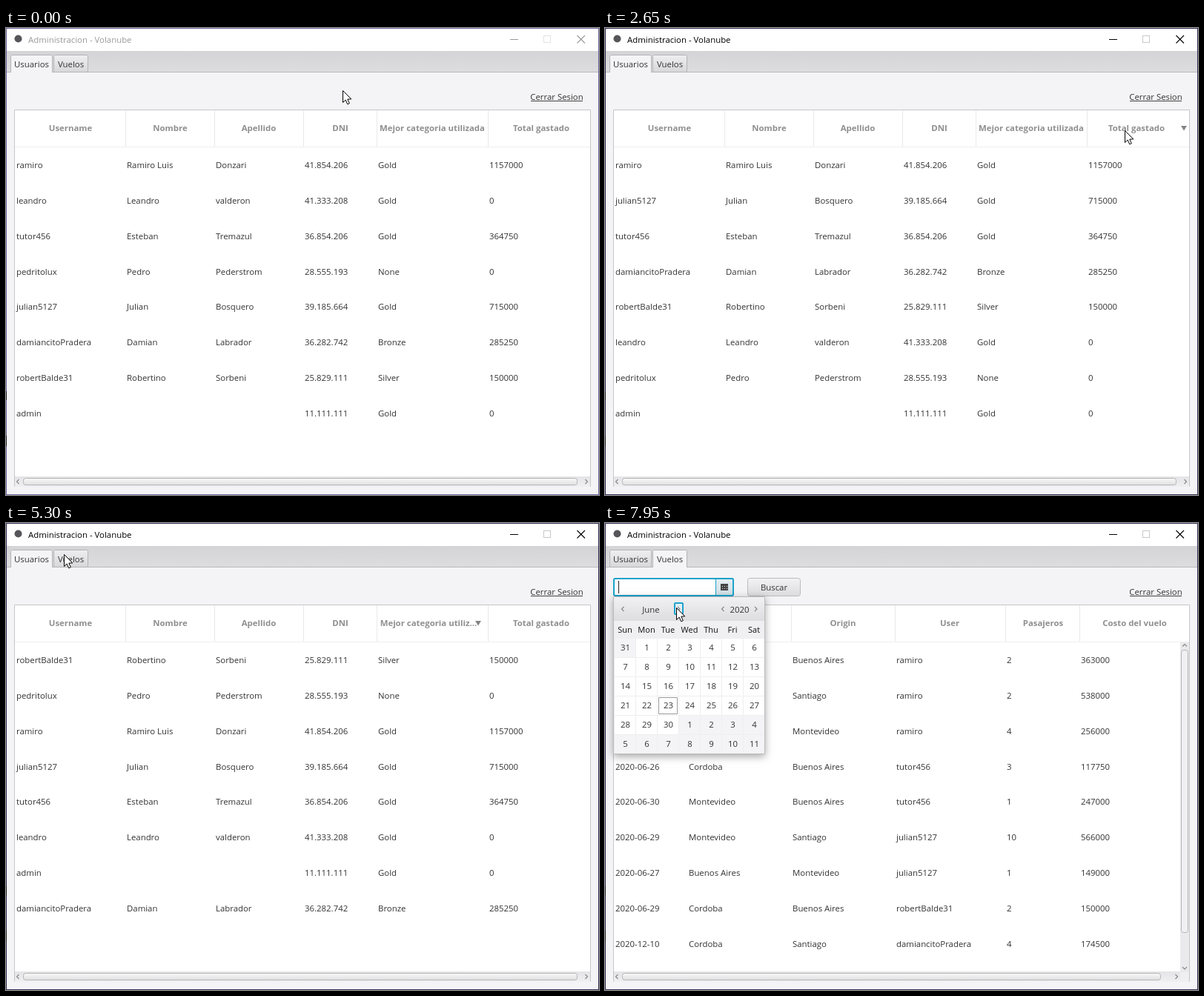
Write an HTML page with a canvas that moves like this. It is 800 by 630 pixels and loops after 8 s.

```html
<!DOCTYPE html>
<html lang="es">
<head>
<meta charset="utf-8">
<title>Administracion</title>
<style>
html, body { margin: 0; width: 100%; height: 100%; overflow: hidden; background: #f4f3f5; }
canvas { display: block; width: 800px; height: 630px; }
</style>
</head>
<body>
<canvas id="stage" width="800" height="630"></canvas>
<script>
const g = document.getElementById('stage').getContext('2d');
const LOOP = 8000, STEP = 50;
const SANS = '"Open Sans", "Noto Sans", sans-serif';
const BODY = `11.4px ${SANS}`, BOLD = `bold 11.4px ${SANS}`, SMALL = `11px ${SANS}`;
const INK = '#333', BLUE = '#1ba3cb', EDGE = '#bcbbbd';

// Moments at which the state jumps
const T = { active: 1100, sort1: 1200, sort2: 2300, sort3: 3600, sort4: 4350,
            flights: 5450, popup: 6800, field: 6850, next: 7950 };

// [start, end, x, y]: the pointer arrives at x, y at the end
const MOVES = [
  [100, 950, 695, 136],
  [1100, 1800, 701, 138],
  [2750, 3200, 601, 134],
  [4350, 5150, 78, 42],
  [5550, 6250, 162, 84],
  [6950, 7850, 96, 114]
];

const users = [
  ['ramiro', 'Ramiro Luis', 'Donzari', '41.854.206', 'Gold', '1157000'],
  ['leandro', 'Leandro', 'valderon', '41.333.208', 'Gold', '0'],
  ['tutor456', 'Esteban', 'Tremazul', '36.854.206', 'Gold', '364750'],
  ['pedritolux', 'Pedro', 'Pederstrom', '28.555.193', 'None', '0'],
  ['julian5127', 'Julian', 'Bosquero', '39.185.664', 'Gold', '715000'],
  ['damiancitoPradera', 'Damian', 'Labrador', '36.282.742', 'Bronze', '285250'],
  ['robertBalde31', 'Robertino', 'Sorbeni', '25.829.111', 'Silver', '150000'],
  ['admin', '', '', '11.111.111', 'Gold', '0']
];
const flights = [
  ['2020-06-25', 'Santiago', 'Buenos Aires', 'ramiro', '2', '363000'],
  ['2020-06-28', 'Buenos Aires', 'Santiago', 'ramiro', '2', '538000'],
  ['2020-06-26', 'Cordoba', 'Montevideo', 'ramiro', '4', '256000'],
  ['2020-06-26', 'Cordoba', 'Buenos Aires', 'tutor456', '3', '117750'],
  ['2020-06-30', 'Montevideo', 'Buenos Aires', 'tutor456', '1', '247000'],
  ['2020-06-29', 'Montevideo', 'Santiago', 'julian5127', '10', '566000'],
  ['2020-06-27', 'Buenos Aires', 'Montevideo', 'julian5127', '1', '149000'],
  ['2020-06-29', 'Cordoba', 'Buenos Aires', 'robertBalde31', '2', '150000'],
  ['2020-12-10', 'Cordoba', 'Santiago', 'damiancitoPradera', '4', '174500']
];

// Each sort is stable and starts from the order before it
const byTotal = (a, b) => a[5] - b[5];
const byClass = (a, b) => a[4] < b[4] ? -1 : a[4] > b[4] ? 1 : 0;
const flip = cmp => (a, b) => cmp(b, a);
const orders = [users];
[byTotal, flip(byTotal), byClass, flip(byClass)].forEach(cmp =>
  orders.push([...orders[orders.length - 1]].sort(cmp)));

function text(s, x, y, { font = BODY, color = INK, align = 'left' } = {}) {
  g.font = font;
  g.fillStyle = color;
  g.textAlign = align;
  g.fillText(s, x, y);
}

function fill(x, y, w, h, color) {
  g.fillStyle = color;
  g.fillRect(x, y, w, h);
}

function shade(y1, y2, c1, c2) {
  const s = g.createLinearGradient(0, y1, 0, y2);
  s.addColorStop(0, c1);
  s.addColorStop(1, c2);
  return s;
}

// The edge lies inside the given rectangle
function box(x, y, w, h, r, paint, edge, width = 1) {
  g.beginPath();
  g.roundRect(x + width / 2, y + width / 2, w - width, h - width, r);
  if (paint) { g.fillStyle = paint; g.fill(); }
  if (edge) { g.strokeStyle = edge; g.lineWidth = width; g.stroke(); }
}

function line(points, color, width = 1) {
  g.beginPath();
  points.forEach(([x, y]) => g.lineTo(x, y));
  g.strokeStyle = color;
  g.lineWidth = width;
  g.stroke();
}

// dx, dy: the direction the chevron points in
function chevron(x, y, dx, dy, r = 3, color = '#858585') {
  const tip = [x + dx * r / 2, y + dy * r / 2];
  const bx = x - dx * r / 2, by = y - dy * r / 2;
  line([[bx - dy * r, by - dx * r], tip, [bx + dy * r, by + dx * r]], color, 1.1);
}

function sortMark(x, up) {
  const k = up ? -1 : 1;
  g.beginPath();
  g.moveTo(x - 4, 135 - 3 * k);
  g.lineTo(x + 4, 135 - 3 * k);
  g.lineTo(x, 135 + 3.5 * k);
  g.fillStyle = '#858587';
  g.fill();
}

function tab(x, w, label, selected, focused) {
  box(x, 36, w, selected ? 27 : 24, 2,
      selected ? '#f4f3f5' : shade(36, 59, '#efeef0', '#d8d7d9'), focused ? BLUE : '#b4b3b6');
  if (selected) fill(x - 1, 60, w + 2, 4, '#f4f3f5');
  text(label, x + w / 2, 53, { align: 'center' });
}

function frame(active, onFlights, focusTab) {
  const ink = active ? '#000' : '#999';
  fill(0, 0, 800, 630, '#f4f3f5');
  fill(0, 0, 800, 31, '#fff');
  g.beginPath();
  g.arc(16.5, 14.5, 5, 0, 7);
  g.fillStyle = '#55555a';
  g.fill();
  text('Administracion - Volanube', 30, 20, { font: `11.4px ${SANS}`, color: ink });
  line([[680, 15.5], [691, 15.5]], ink);
  g.strokeStyle = active ? '#c8c8c8' : '#e2e2e2';
  g.strokeRect(725.5, 10.5, 9, 9);
  line([[770.5, 10], [781, 20.5]], ink, 1.1);
  line([[781, 10], [770.5, 20.5]], ink, 1.1);

  fill(1, 31, 798, 29, shade(31, 60, '#d4d3d6', '#dddcdf'));
  fill(1, 59, 798, 1, '#b9b8bb');
  tab(6, 57, 'Usuarios', !onFlights, false);
  tab(64, 47, 'Vuelos', onFlights, focusTab);
  text('Cerrar Sesion', 743, 97, { align: 'center' });
  fill(708, 98, 70, 1, '#444');

  g.strokeStyle = active ? '#35305a' : '#7068a0';
  g.lineWidth = 1;
  g.strokeRect(.5, .5, 799, 629);
  fill(0, 490, 1, 12, '#222');
  fill(0, 550, 1, 14, '#222');
}

function hBar(right, thumbEnd) {
  fill(12, 605, right - 12, 14, shade(605, 619, '#e4e3e5', '#f0eff1'));
  box(23, 607, thumbEnd - 23, 10, 3, shade(607, 617, '#fafafa', '#dfdee0'), '#b5b4b7');
  chevron(16, 612, -1, 0);
  chevron(right - 5, 612, 1, 0);
}

function vBar() {
  fill(776, 161, 12, 445, '#eae9eb');
  fill(776, 606, 12, 13, '#efeef0');
  box(777, 171, 10, 382, 3, '#f0eff1', '#b5b4b7');
  chevron(782, 165, 0, -1);
  chevron(782, 600.5, 0, 1);
}

// heads: [label, centre]; edges: column borders
function table(heads, edges, rows) {
  box(11, 110, 778, 509, 0, '#fff', '#c6c5c8');
  fill(12, 160, 776, 1, '#efeff0');
  edges.forEach(x => fill(x, 111, 1, 49, '#e9e8ea'));
  heads.forEach(([s, x]) => text(s, x, 139, { font: BOLD, color: '#8f8f91', align: 'center' }));
  const xs = [12, ...edges];
  rows.forEach((row, i) => {
    const y = Math.round(189 + 47.87 * i);
    row.forEach((s, c) => text(s, xs[c] + 2, y));
  });
}

function usersPage(sort) {
  const cut = sort > 2, marked = sort === 1 || sort === 2;
  table([
    ['Username', 87], ['Nombre', 221.5], ['Apellido', 341], ['DNI', 451],
    cut ? ['Mejor categoria utiliz...', 570] : ['Mejor categoria utilizada', 575],
    ['Total gastado', marked ? 717 : 722]
  ], [161, 281, 401, 500, 650], orders[sort]);
  if (sort) sortMark(cut ? 637 : 781, sort % 2 === 1);
  hBar(788, 771);
}

function dateField(focused, hover) {
  const [top, low] = hover ? ['#fbfbfb', '#ececed'] : focused ? ['#e6eff3', '#cddde3'] : ['#f3f2f4', '#dddcdf'];
  box(11, 74, 163, 25, 3, '#fff', EDGE);
  box(149, 74, 25, 25, 2, shade(74, 99, top, low), EDGE);
  if (focused) {
    box(11, 74, 163, 25, 2, null, BLUE, 2);
    fill(149, 76, 1, 21, BLUE);
    fill(18, 78, 1, 17, '#222');
  }
  fill(156, 82, 10, 9, '#444');
  for (let i = 0; i < 6; i++) fill(158 + i % 3 * 3, 85 + (i / 3 | 0) * 3, 1, 1, '#ddd');
  box(192, 74, 72, 25, 3, shade(74, 99, '#f3f2f4', '#dbdadd'), EDGE);
  text('Buscar', 228, 91, { align: 'center' });
}

function calendar(nextFocused) {
  const mid = { align: 'center' };
  g.save();
  g.shadowColor = 'rgba(0,0,0,.35)';
  g.shadowBlur = 10;
  g.shadowOffsetY = 3;
  fill(11, 99, 205, 213, '#fff');
  g.restore();
  fill(12, 100, 203, 32, shade(100, 132, '#f1f0f2', '#dddcdf'));
  fill(12, 132, 203, 23, '#f0eff1');
  text('June', 62, 121, mid);
  text('2020', 181.5, 121, mid);
  if (nextFocused) box(93, 107, 13, 17, 1, '#e3eef3', BLUE, 2);
  [[24, -1], [99.5, 1], [159, -1], [203.5, 1]].forEach(([x, d]) => chevron(x, 116, d, 0));
  'Sun Mon Tue Wed Thu Fri Sat'.split(' ').forEach((s, i) =>
    text(s, 27 + 29 * i, 148, { font: SMALL, color: '#111', align: 'center' }));
  for (let i = 0; i < 42; i++) {
    const x = 27 + i % 7 * 29, y = 168 + (i / 7 | 0) * 26;
    const other = i < 1 || i > 30;
    const day = i < 1 ? 31 : i > 30 ? i - 30 : i;
    box(x - 15, y - 13, 30, 27, 0, other ? '#f4f3f5' : '#fff', '#efeef0');
    text(day, x + .5, y + 4, mid);
  }
  box(72, 235, 26, 23, 0, null, nextFocused ? '#9b9b9d' : BLUE);
  box(11, 99, 205, 213, 0, null, '#bbbabd');
}

function flightsPage(t) {
  table([
    ['Fecha', 62], ['Destino', 181], ['Origin', 321], ['User', 465],
    ['Pasajeros', 591], ['Costo del vuelo', 714.5]
  ], [111, 251, 391, 540, 640], flights);
  hBar(776, 750);
  vBar();
  dateField(t >= T.field, t >= 6200 && t < 7050);
  if (t >= T.popup) calendar(t >= T.next);
}

function pointer(t) {
  let x = 454, y = 84;
  for (const [a, b, tx, ty] of MOVES) {
    if (t <= a) break;
    const p = Math.min(1, (t - a) / (b - a));
    const e = p * p * (3 - 2 * p);
    x += (tx - x) * e;
    y += (ty - y) * e;
  }
  g.save();
  g.translate(Math.round(x) + .5, Math.round(y) + .5);
  g.beginPath();
  [[0, 0], [0, 16], [3.7, 12.6], [6.2, 18.3], [8.8, 17.2], [6.3, 11.6], [11.3, 11.4]]
    .forEach(([px, py]) => g.lineTo(px, py));
  g.closePath();
  g.fillStyle = '#fff';
  g.fill();
  g.strokeStyle = '#000';
  g.lineWidth = 1;
  g.stroke();
  g.restore();
}

function draw(now) {
  const t = Math.floor(now % LOOP / STEP) * STEP;
  const onFlights = t >= T.flights;
  frame(t >= T.active, onFlights, onFlights && t < T.field);
  if (onFlights) flightsPage(t);
  else usersPage([T.sort1, T.sort2, T.sort3, T.sort4].filter(s => t >= s).length);
  pointer(t);
}

const start = performance.now();
function tick() {
  draw(performance.now() - start);
  requestAnimationFrame(tick);
}
tick();
</script>
</body>
</html>
```
